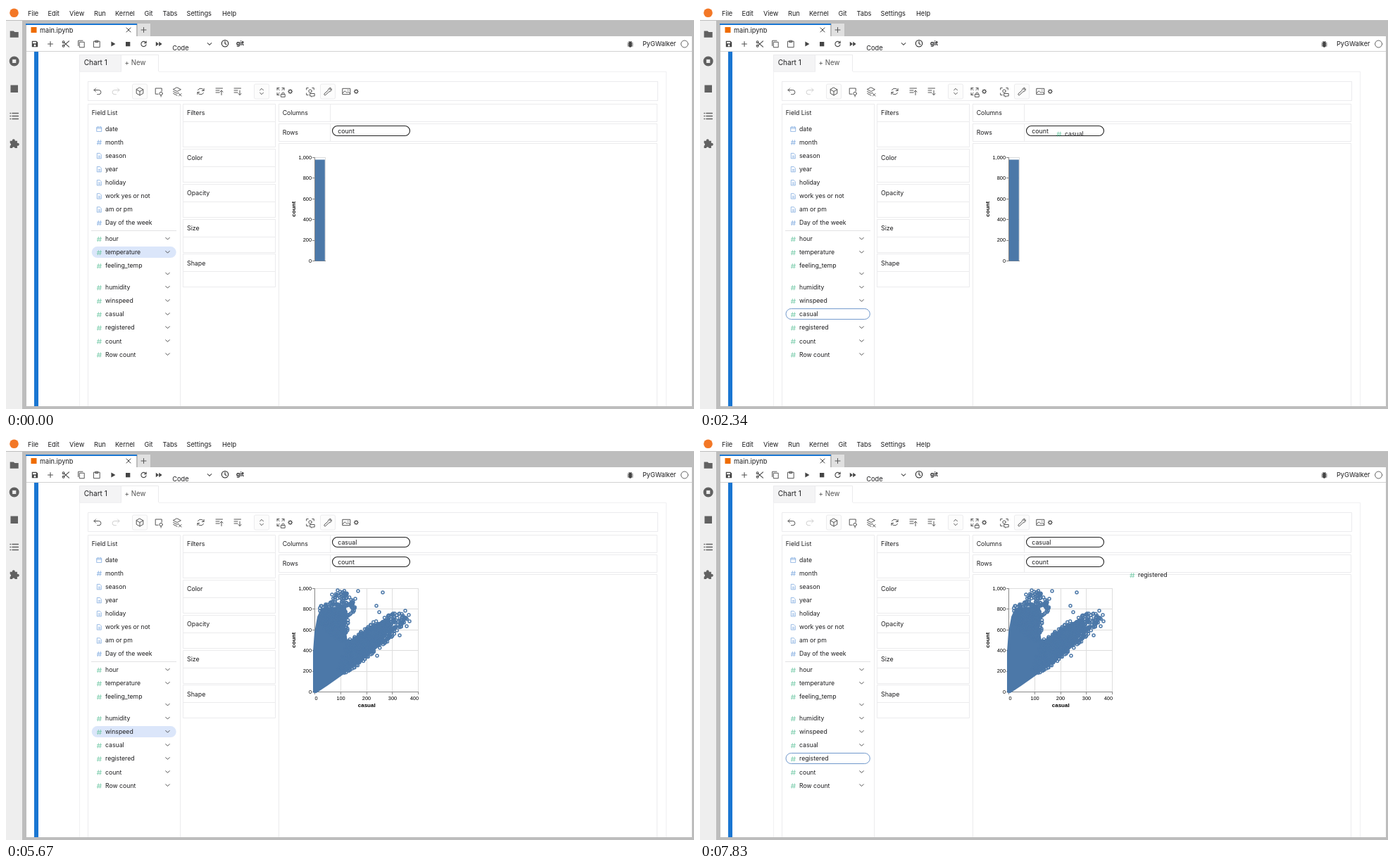
Recreate the animation shown at these times as an HTML page with a canvas. Size 977x573 px, loop 8 s.

```html
<!DOCTYPE html>
<html lang="en">
<head>
<meta charset="utf-8">
<title>Chart builder</title>
<style>
  html, body { margin: 0; width: 977px; height: 573px; overflow: hidden; background: #fff; }
  canvas, svg { position: absolute; left: 0; top: 0; display: block; }
  svg text { font-family: Inter, Roboto, sans-serif; white-space: pre; }
  svg text.axis { font-family: "Liberation Sans", Arial, sans-serif; }
</style>
</head>
<body>
<canvas id="stage" width="977" height="573"></canvas>
<svg id="labels" width="977" height="573" viewBox="0 0 977 573"></svg>
<script>
const LOOP = 8000, STEP = 90;
const INK = '#1c1c1e', GRAY = '#555', LINE = '#ebebed', DOCK = '#bdbdbd', BLUE = '#4c78a8';
const DIM = '#78a6de', MEASURE = '#62c39d';
const ctx = document.getElementById('stage').getContext('2d');
const svg = document.getElementById('labels');

// ---------- text ----------
function label(str, x, y, size = 8.7, opt = {}) {
  const el = document.createElementNS('http://www.w3.org/2000/svg', 'text');
  el.textContent = str;
  el.setAttribute('x', x);
  el.setAttribute('y', y);
  el.setAttribute('font-size', size);
  el.setAttribute('fill', opt.fill || INK);
  if (opt.weight) el.setAttribute('font-weight', opt.weight);
  if (opt.anchor) el.setAttribute('text-anchor', opt.anchor);
  if (opt.axis) el.setAttribute('class', 'axis');
  if (opt.turn) el.setAttribute('transform', `rotate(-90 ${x} ${y})`);
  svg.appendChild(el);
  return el;
}
const show = (el, on) => el.setAttribute('visibility', on ? 'visible' : 'hidden');

// ---------- shapes ----------
function rect(x, y, w, h, color) {
  ctx.fillStyle = color;
  ctx.fillRect(x, y, w, h);
}
function frame(x, y, x2, y2, color = LINE) {
  ctx.strokeStyle = color;
  ctx.lineWidth = 1;
  ctx.strokeRect(x + 0.5, y + 0.5, x2 - x - 1, y2 - y - 1);
}
function pill(x, y, w, h, r, fill, stroke, lw = 1) {
  ctx.beginPath();
  ctx.roundRect(x, y, w, h, r);
  if (fill) { ctx.fillStyle = fill; ctx.fill(); }
  if (stroke) { ctx.strokeStyle = stroke; ctx.lineWidth = lw; ctx.stroke(); }
}
// Icon path drawn around its centre; lw 0 means filled.
function icon(x, y, d, lw = 1, color = GRAY) {
  ctx.save();
  ctx.translate(x, y);
  const p = new Path2D(d);
  ctx.lineCap = ctx.lineJoin = 'round';
  ctx.strokeStyle = ctx.fillStyle = color;
  ctx.lineWidth = lw;
  if (lw) ctx.stroke(p); else ctx.fill(p, 'evenodd');
  ctx.restore();
}
const circle = r => `M${r} 0A${r} ${r} 0 1 1 ${-r} 0A${r} ${r} 0 1 1 ${r} 0Z`;
const HASH = 'M-1 -3.2L-2 3.2M2 -3.2L1 3.2M-2.8 -1.2H3.2M-3.2 1.3H2.8';
const DOC = 'M-2.7 -3.7H.8L2.9 -1.6V3.7H-2.7ZM-1.2 .2H1.3M-1.2 2H1.3';
const CALENDAR = 'M-3.3 -2.6H3.3V3.5H-3.3ZM-3.3 -.8H3.3M-1.6 -3.6V-2.2M1.6 -3.6V-2.2';
const CHEVRON = 'M-2.8 -1.4L0 1.4L2.8 -1.4';
const REFRESH = 'M4.4 -1A4.5 4.5 0 0 0 -4 -1.8M-4.4 1A4.5 4.5 0 0 0 4 1.8M4.6 -4V-1H1.8M-4.6 4V1H-1.8';
const GEAR = circle(2.1) + 'M0 -3V-2.4M0 3V2.4M-3 0H-2.4M3 0H2.4M-2.1 -2.1L-1.7 -1.7M2.1 2.1L1.7 1.7M-2.1 2.1L-1.7 1.7M2.1 -2.1L1.7 -1.7';

// ---------- fields ----------
const dims = ['date', 'month', 'season', 'year', 'holiday', 'work yes or not', 'am or pm', 'Day of the week']
  .map((name, i) => ({ name, y: 174.4 + i * 19.1, mark: i === 0 ? CALENDAR : i === 1 || i === 7 ? HASH : DOC }));
const measures = ['hour', 'temperature', 'feeling_temp', 'humidity', 'winspeed', 'casual', 'registered', 'count', 'Row count']
  .map((name, i) => ({ name, y: 331 + i * 19.1 + (i > 2 ? 11.7 : 0), tall: i === 2 }));

const hovers = [[0, 'temperature'], [360, ''], [540, 'humidity'], [630, 'winspeed'], [810, 'casual'],
  [900, 'registered'], [990, ''], [1080, 'casual'], [1800, ''], [5310, 'hour'], [5400, 'temperature'],
  [5490, 'feeling_temp'], [5670, 'winspeed'], [5760, 'registered'], [6030, ''], [6390, 'registered'], [7020, '']];

const drags = [
  { name: 'casual', end: 2970, keys: [[1710, 174, 481], [2160, 619, 188], [2340, 518, 181.5], [2430, 505, 177], [2880, 487, 152]] },
  { name: 'registered', end: LOOP, keys: [[7020, 243, 473], [7740, 623, 195], [7830, 622, 196]] }
];
function along(keys, t) {
  let i = 0;
  while (i < keys.length - 2 && t >= keys[i + 1][0]) i++;
  const [t0, x0, y0] = keys[i], [t1, x1, y1] = keys[i + 1];
  const u = Math.min(1, (t - t0) / (t1 - t0));
  const e = (1 - Math.cos(Math.PI * u)) / 2;
  return [x0 + (x1 - x0) * e, y0 + (y1 - y0) * e];
}

// ---------- static labels ----------
[['File', 31], ['Edit', 59.5], ['View', 90], ['Run', 125], ['Kernel', 155], ['Git', 196.5], ['Tabs', 222.5],
 ['Settings', 256.5], ['Help', 307]].forEach(([s, x]) => label(s, x, 14.2, 9.2));
label('main.ipynb', 48, 37.6, 9.2);
label('Code', 236.3, 62.5, 9.2);
label('git', 327, 56, 8.6, { weight: 700 });
label('PyGWalker', 904, 57.2, 9.2);
label('Chart 1', 110.8, 84, 10);
label('+ New', 168.5, 84, 9.7, { fill: '#555' });
label('Field List', 121.7, 154.8);
[['Filters', 155.2], ['Color', 219], ['Opacity', 269], ['Size', 319], ['Shape', 368.6]]
  .forEach(([s, y]) => label(s, 257, y, 8.8));
label('Columns', 392.7, 155.2);
label('Rows', 392.7, 183);
label('count', 471.3, 180.8, 8.8);
[...dims, ...measures].forEach(f => label(f.name, 141, f.y + 3.1));
for (let i = 0; i <= 5; i++)
  label(i === 5 ? '1,000' : String(i * 200), 434, 364.8 - i * 29.4, 7.35, { anchor: 'end', axis: 1, fill: '#000' });
label('count', 411, 288.8, 8, { anchor: 'middle', axis: 1, weight: 700, fill: '#000', turn: 1 });

const scatterLabels = [0, 1, 2, 3, 4].map(i =>
  label(String(i * 100), [438.6, 475.6, 512, 549, 586][i], 373.8, 7.35,
    { axis: 1, fill: '#000', anchor: i === 0 ? 'start' : i === 4 ? 'end' : 'middle' }));
scatterLabels.push(label('casual', 512.2, 384.4, 8, { axis: 1, weight: 700, fill: '#000', anchor: 'middle' }));
const casualPill = label('casual', 471.3, 152.8, 8.8);
const ghost = label('', 0, 0);

// ---------- notebook shell ----------
function shell() {
  rect(0, 0, 977, 573, '#fff');
  rect(0, 20, 24, 553, '#eeeeee');
  rect(24, 20, 953, 553, DOCK);
  rect(0, 20, 977, 1, DOCK);
  rect(23, 21, 1, 552, DOCK);
  rect(29, 43, 945, 526, '#fff');
  rect(29, 25, 156, 19, '#fff');
  rect(28, 25, 158, 2, '#1976d2');
  rect(187, 25, 18, 18, '#e0e0e0');
  rect(29, 64, 945, 1, '#d2d2d2');
  rect(40, 65, 6, 504, '#1976d2');

  icon(11.5, 9.7, circle(6.3), 0, '#f37726');
  rect(35.5, 30, 8, 8, '#ef6c00');
  icon(174, 34, 'M-3 -3L3 3M3 -3L-3 3', 1, '#444');
  icon(195.5, 34, 'M-3.5 0H3.5M0 -3.5V3.5', 1, '#555');

  const side = '#616161';
  icon(11.7, 40, 'M-6 -4.5H-1L.7 -3H6V4.8H-6Z', 0, side);
  icon(11.7, 78.5, circle(7) + 'M-2.6 -2.6H2.6V2.6H-2.6Z', 0, side);
  rect(6.5, 112.5, 10.5, 10.5, side);
  icon(11.7, 156.5, 'M-5.7 -4H-5M-5.7 0H-5M-5.7 4H-5M-2.7 -4H5.7M-2.7 0H5.7M-2.7 4H5.7', 1.4, side);
  icon(11.7, 195.5, 'M-6 -3.7H-2.8A2 2 0 1 1 1 -3.7H4.2V-.6A2 2 0 1 1 4.2 3V6.5H1A2 2 0 0 0 -2.8 6.5H-6V3.2A2 2 0 0 0 -6 -.6Z', 0, side);

  icon(41, 54, 'M-4.2 -4.2H2.3L4.2 -2.3V4.2H-4.2ZM-2.9 -3V-.8H1.8V-3ZM1.5 2A1.5 1.5 0 1 0 -1.5 2A1.5 1.5 0 1 0 1.5 2Z', 0, '#444');
  icon(63, 54, 'M-3.5 0H3.5M0 -3.5V3.5', 1.1);
  icon(85, 54, 'M-2.7 -2.2L4.5 4.2M-2.7 2.2L4.5 -4.2M-2 -2.8A1.4 1.4 0 1 1 -4.8 -2.8A1.4 1.4 0 1 1 -2 -2.8M-2 2.8A1.4 1.4 0 1 1 -4.8 2.8A1.4 1.4 0 1 1 -2 2.8', 1.1, '#444');
  icon(107, 54, 'M-2.3 -2.7H4.2V4.8H-2.3ZM-4.4 2.5V-4.8H2', 1);
  icon(129, 54, 'M-4.2 -3.8H4.2V4.7H-4.2ZM-1.8 -4.8H1.8V-2.4H-1.8Z', 1);
  icon(152, 54, 'M-2.6 -3.6L3.4 0L-2.6 3.6Z', 0, '#444');
  rect(170, 51, 6.3, 6.3, '#444');
  icon(195.5, 54, 'M2.7 -2.4A3.6 3.6 0 1 0 3.5 .8M3.6 -4V-1.2H.8', 1.1, '#444');
  icon(217, 54, 'M-4.2 -3.2L0 0L-4.2 3.2ZM.2 -3.2L4.6 0L.2 3.2Z', 0, '#444');
  icon(289, 54, CHEVRON, 1.1);
  icon(311, 53.3, circle(4.7) + 'M0 -2.8V.2L2 1.4', 1.2, '#333');
  icon(886.5, 54.5, 'M-2.2 -2A2.2 2.2 0 0 1 2.2 -2V2A2.2 2.2 0 0 1 -2.2 2Z', 0, '#444');
  icon(886.5, 54.5, 'M-3.6 -1.7H3.6M-3.8 .3H3.8M-3.6 2.3H3.6M-2 -4L-1 -3M2 -4L1 -3', 0.9, '#444');
  icon(963.6, 54, circle(5), 1, '#616161');
}

// ---------- chart builder ----------
function builder() {
  rect(104, 69, 59, 24, '#f4f4f5');
  frame(104, 69, 217, 94);
  rect(163, 69, 1, 24, LINE);
  frame(104, 93, 938, 575, '#f0f0f2');
  rect(164, 93, 53, 1, '#fff');
  frame(116, 107, 926, 135);
  frame(116, 139, 248, 575);
  [[139, 201], [203, 251], [253, 301], [303, 351], [352, 400]].forEach(([a, b]) => {
    frame(251, a, 383, b);
    rect(251, a + 25, 132, 1, LINE);
  });
  frame(387, 139, 925, 165);
  frame(387, 167, 925, 193);
  frame(387, 195, 925, 575);
  rect(460, 139, 1, 26, LINE);
  rect(460, 167, 1, 26, LINE);
  rect(121, 319, 121, 1, '#e2e2e4');
  rect(24, 569, 953, 4, DOCK);

  [190, 363, 457].forEach(x => pill(x - 10.5, 111, 21, 21, 2, '#fcfcfc', '#ececee'));
  const y = 121.5;
  icon(130, y, 'M-2.4 -4.6L-5 -2L-2.4 .6M-5 -2H1.8A3 3 0 0 1 1.8 4.2H-.4', 1);
  icon(156, y, 'M2.4 -4.6L5 -2L2.4 .6M5 -2H-1.8A3 3 0 0 0 -1.8 4.2H.4', 1, '#d0d0d0');
  icon(190, y, 'M0 -5.4L4.8 -2.8V2.8L0 5.4L-4.8 2.8V-2.8ZM-4.8 -2.8L0 0L4.8 -2.8M0 0V5.4', 1);
  icon(217, y, 'M-.8 3.7H-4.8V-4.5H4.2V-.3M5.3 3A2.2 2.2 0 1 1 .9 3A2.2 2.2 0 1 1 5.3 3M3.1 5.2V7.5', 1);
  icon(243, y, 'M0 -5.6L5.4 -2.8L0 0L-5.4 -2.8ZM-5.4 0L0 2.8L2 1.8M-5.4 2.8L0 5.6M2.5 3L6 6.5M6 3L2.5 6.5', 1);
  icon(276.5, y, REFRESH, 1);
  icon(303, y, 'M-5 -4.5H4.5M-5 -1.5H0M-5 1.5H0M3 5V-1.4M1 .6L3 -1.4L5 .6', 1);
  icon(329, y, 'M-5 -4.5H4.5M-5 -1.5H0M-5 1.5H0M3 -1.4V5M1 3L3 5L5 3', 1);
  icon(363, y, 'M-2.4 -1.8L0 -4.2L2.4 -1.8M-2.4 1.8L0 4.2L2.4 1.8', 1);
  icon(390, y, 'M-5 -2V-5H-2M-5 -5L-1.8 -1.8M2 -5H5V-2M5 -5L1.8 -1.8M-5 2V5H-2M-5 5L-1.8 1.8M.8 4H6.2V7.8H.8ZM2 4V2.8A1.5 1.5 0 0 1 5 2.8V4', 1);
  icon(403.7, y, GEAR, 1.1);
  icon(432, y, 'M-5.3 -2.5V-5H-2.8M2.8 -5H5.3V-2.5M-5.3 2.5V5H-2.8M2.2 -.5A2.2 2.2 0 1 1 -2.2 -.5A2.2 2.2 0 1 1 2.2 -.5M0 3H6.2V6.5H3.5L2 7.8V6.5H0Z', 1);
  icon(457, y, 'M-4.8 3.2L.4 -1.7A3.2 3.2 0 0 1 4.2 -5L2.4 -3L3.2 -2L5.2 -3.8A3.2 3.2 0 0 1 1.8 .3L-3.2 5A1.2 1.2 0 0 1 -4.8 3.2Z', 1);
  icon(483.5, y, 'M-5.3 -4.2H5.3V4.2H-5.3ZM-5.3 2.2L-2.2 -.8L.5 2L2.2 .4L5.3 3M2 -2H2.4', 1);
  icon(497.3, y, GEAR, 1.1);
}

function rows(hover, drag) {
  dims.forEach(f => icon(132.4, f.y + 0.5, f.mark, 0.75, DIM));
  measures.forEach(f => {
    const held = drag && drag.name === f.name, lit = hover === f.name;
    const h = f.tall ? 28 : 16;
    if (lit) pill(121.7, f.y - 8, 120, h, h / 2, '#dbe6fa');
    if (held) pill(122, f.y - 7.8, 119.3, 15, 7.5, null, '#7098cc', 1);
    icon(132.4, f.y + 0.6, HASH, 0.7, MEASURE);
    if (!held) icon(229.5, f.y + (f.tall ? 11.4 : -0.3), CHEVRON, 0.9, '#444');
  });
}

// ---------- charts ----------
function axes(width) {
  const grid = '#dddddd', axis = '#888888';
  for (let i = 0; i <= 5; i++) {
    const y = Math.round(362 - i * 29.4);
    rect(438, y, width, 1, grid);
    rect(435, y, 4, 1, axis);
  }
  rect(438 + width, 215, 1, 148, grid);
  rect(438, 215, 1, 148, axis);
  rect(438, 362, width + 1, 1, axis);
}
function barChart() {
  axes(15);
  rect(439, 218.5, 13.8, 144, BLUE);
}

const poly = flat => {
  const p = new Path2D();
  for (let i = 0; i < flat.length; i += 2) p.lineTo(flat[i], flat[i + 1]);
  p.closePath();
  return p;
};
const core = poly([438, 362, 438, 305, 440, 278, 444, 256, 449, 245, 462, 244, 478, 242, 483, 248, 480, 270, 483, 291,
  490, 290, 505, 280, 520, 270, 543, 259, 546, 268, 530, 295, 515, 308, 500, 320, 485, 331, 455, 352, 440, 362]);
const crown = poly([443, 262, 446, 241, 452, 237, 460, 235, 467, 225, 473, 218, 481, 218, 488, 228, 494, 233, 496, 246,
  488, 258, 485, 275, 484, 290, 470, 290]);
const arm = poly([486, 289, 498, 279, 522, 263, 547, 251, 562, 250, 571, 258, 558, 274, 545, 289, 530, 301, 515, 313,
  500, 325, 480, 338, 470, 330]);
const strays = [500, 219, 535, 221, 526, 240, 496, 230, 494, 243, 567, 247, 572, 253, 573, 262, 569, 269,
  552, 251, 559, 282, 527, 311, 530, 249, 463, 224, 471, 218, 481, 222];

function scatter() {
  axes(147);
  for (let i = 0; i <= 4; i++) {
    const x = Math.round(438 + i * 36.75);
    if (i) rect(x, 215, 1, 147, '#dddddd');
    rect(x, 362, 1, 4, '#888888');
  }
  rect(438, 215, 1, 148, '#888888');
  ctx.fillStyle = ctx.strokeStyle = BLUE;
  ctx.lineJoin = 'round';
  ctx.lineWidth = 4;
  ctx.fill(core);
  ctx.stroke(core);
  ctx.lineWidth = 1.45;
  const dot = (x, y) => {
    ctx.beginPath();
    ctx.arc(x, y, 2, 0, Math.PI * 2);
    ctx.stroke();
  };
  let seed = 41;
  const rnd = () => (seed = (seed * 16807) % 2147483647) / 2147483647;
  const spread = (area, x, y, w, h, n) => {
    while (n > 0) {
      const px = x + rnd() * w, py = y + rnd() * h;
      if (ctx.isPointInPath(area, px, py)) { dot(px, py); n--; }
    }
  };
  spread(crown, 442, 216, 56, 75, 300);
  spread(arm, 468, 248, 106, 92, 420);
  for (let i = 0; i < strays.length; i += 2) dot(strays[i], strays[i + 1]);
}

// ---------- timeline ----------
function draw(t) {
  const hover = hovers.filter(h => h[0] <= t).pop()[1];
  const drag = drags.find(d => t >= d.keys[0][0] && t < d.end);
  const dropped = t >= 2970, plotted = t >= 3420;

  shell();
  builder();
  rows(hover, drag);
  pill(463.5, 170.5, 110, 14, 7, '#fff', '#222', 1.1);
  if (dropped) pill(463.5, 142.5, 110, 14, 7, '#fff', '#222', 1.1);
  if (plotted) scatter(); else barChart();

  show(casualPill, dropped);
  scatterLabels.forEach(el => show(el, plotted));
  show(ghost, !!drag);
  if (drag) {
    const [x, y] = along(drag.keys, t);
    ghost.textContent = drag.name;
    ghost.setAttribute('x', x);
    ghost.setAttribute('y', y + 3.1);
    icon(x - 8.2, y + 0.7, HASH, 0.7, MEASURE);
  }
}

let last = -1;
const start = performance.now();
function tick(now) {
  const t = Math.floor((Math.max(0, now - start) % LOOP) / STEP) * STEP;
  if (t !== last) draw(last = t);
  requestAnimationFrame(tick);
}
draw(0);
requestAnimationFrame(tick);
</script>
</body>
</html>
```
